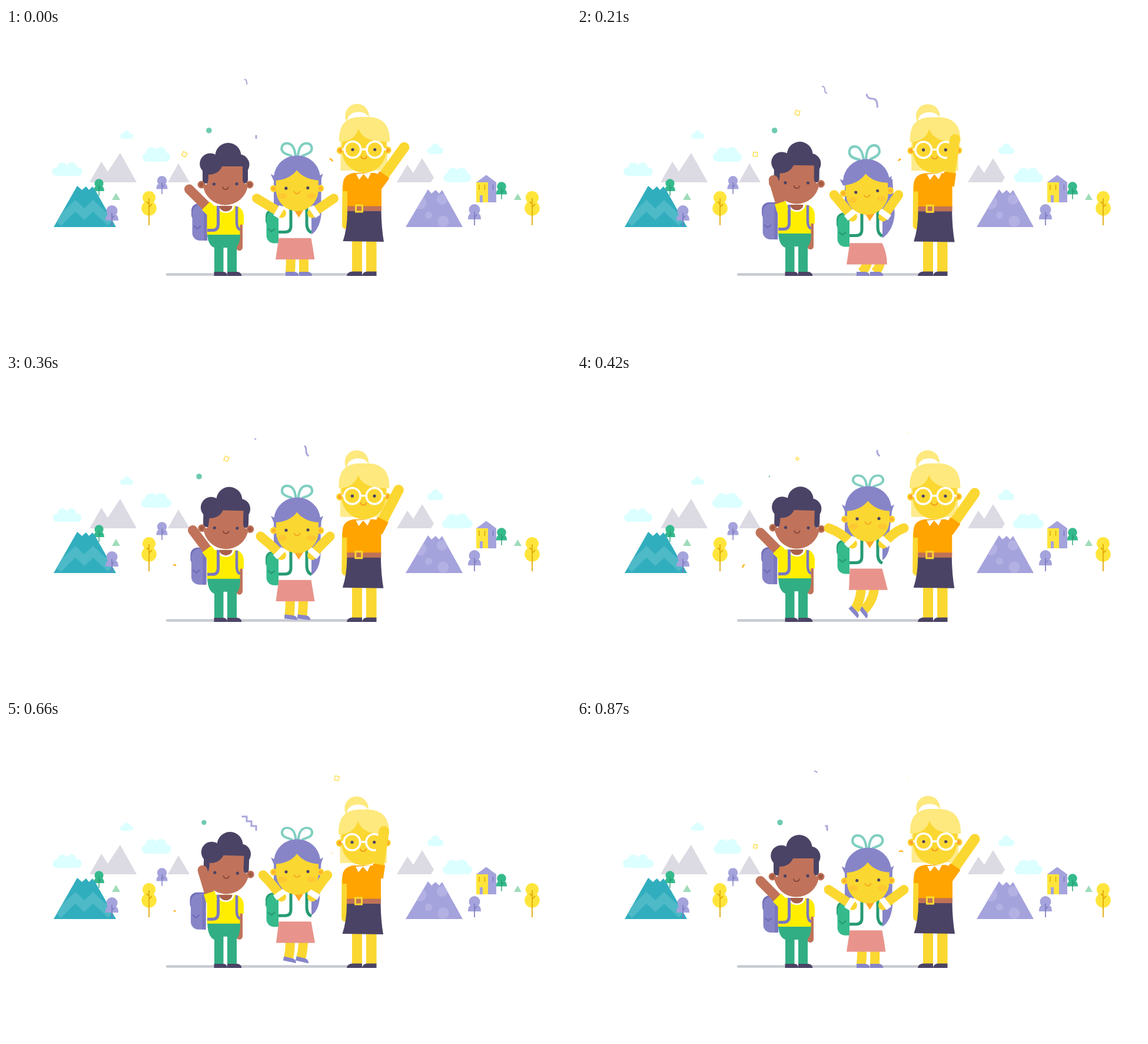
Animation, 960 px wide and 540 px high, one loop 900 ms. Source, as an HTML page with a canvas:

```html
<!DOCTYPE html>
<html lang="en">
<head>
<meta charset="utf-8">
<title>Waving class</title>
<style>
  html, body { margin: 0; width: 100%; height: 100%; overflow: hidden; background: #fff; }
  canvas { display: block; width: 960px; height: 540px; }
</style>
</head>
<body>
<canvas id="stage" width="960" height="540"></canvas>
<script>
const ctx = document.getElementById('stage').getContext('2d');
const LOOP = 900, STEP = 30, BEAT = LOOP / 2, TAU = 2 * Math.PI, RAD = Math.PI / 180;

const SKIN = '#fbd731', BROWN = '#c0735a', INK = '#4b4365', LILAC = '#8785c8',
      PALE = '#a5a3dc', MIST = '#b3b1e3', GREEN = '#35ba8c', DEEP = '#279b74',
      ORANGE = '#ffa400', BLOND = '#fde97d', SUN = '#ffe53b', MUD = '#e0a90c',
      SKY = '#dcffff', TRUNK = '#7d7ac0';
let t = 0;

// Timing
const clamp = u => Math.min(1, Math.max(0, u));
function ramp(from, to) {
  const u = clamp((t - from) / (to - from));
  return u * u * (3 - 2 * u);
}
const since = start => (t - start + LOOP) % LOOP;
const pop = (start, life) => clamp(Math.min(since(start), life - since(start)) / 70);
const wave = (delay, beat = BEAT) => Math.cos((t - delay) / beat * TAU);
const rise = () => Math.min(1, t / 560) * (1 - ramp(660, 880));

// Drawing
function fill(d, color) { ctx.fillStyle = color; ctx.fill(new Path2D(d)); }
function line(d, color, width, cap = 'butt') {
  ctx.strokeStyle = color; ctx.lineWidth = width; ctx.lineCap = cap;
  ctx.stroke(new Path2D(d));
}
function oval(x, y, rx, ry, color) {
  ctx.fillStyle = color;
  ctx.beginPath(); ctx.ellipse(x, y, rx, ry, 0, 0, TAU); ctx.fill();
}
function dot(x, y, r, color) { oval(x, y, r, r, color); }
function arc(x, y, r, from, to, color, width) {
  ctx.strokeStyle = color; ctx.lineWidth = width; ctx.lineCap = 'butt';
  ctx.beginPath(); ctx.arc(x, y, r, from * RAD, to * RAD); ctx.stroke();
}
function box(x, y, w, h, color, r = 0) {
  ctx.fillStyle = color;
  ctx.beginPath(); ctx.roundRect(x, y, w, h, r); ctx.fill();
}
function at(x, y, deg, draw) {
  ctx.save(); ctx.translate(x, y); ctx.rotate(deg * RAD); draw(); ctx.restore();
}
function clipped(d, draw) {
  ctx.save(); ctx.clip(new Path2D(d)); draw(); ctx.restore();
}

// Scenery
function cloud(x, y, w, h, grow = 0) {
  ctx.save();
  ctx.translate(x, y);
  ctx.scale(1 + grow * (1 - wave(0, LOOP)) / 2, 1);
  box(-w / 2, -h * .62, w, h * .62, SKY, h * .31);
  if (grow) {
    dot(-w * .17, -h * .6, h * .38, SKY); dot(w * .15, -h * .62, h * .38, SKY);
  } else dot(0, -h * .62, h * .38, SKY);
  ctx.restore();
}
function bush(x, top, s, color, trunk) {
  at(x, top, 0, () => {
    ctx.scale(s, s);
    fill('M-11,25C-11,18 -9,16 -7,15A9.5,9.5 0 1 1 7,15C9,16 11,18 11,25Z', color);
    line('M0,12V35M0,21l4,-4', trunk, 1.7);
  });
}
function poplar(x) {
  dot(x, 288, 11, SUN); dot(x, 306, 12.8, SUN);
  line(`M${x},289V335M${x},304l5,-5M${x},299l-4,-4`, MUD, 1.8);
}
function house() {
  fill('M799,262L816,249.5 833,262V296H799Z', PALE);
  box(799, 262, 20, 34, SUN);
  line('M804,266V275M813.5,266V275', MUD, 1.6);
  box(805, 284, 5, 12, PALE);
  line('M827.5,266V275', TRUNK, 1.6);
}
function scenery() {
  cloud(104, 251, 52, 23, -.08); cloud(255.5, 227, 47, 25, .11); cloud(205, 188, 22, 14);
  cloud(729.5, 214, 27, 18); cloud(767, 262, 47, 25, .11);
  fill('M142,262L162,227 173,244 194,212 222,262ZM275,262L293,230 312,262Z', '#dcdae3');
  fill('M664,262L682,232 692,246 707,221 727,254 722,262Z', '#dcdae3');

  bush(158, 257, .8, GREEN, DEEP);
  const peak = 'M81,338L121,268 129,275 136,269 141,275 147,269 152,276 187,338Z';
  fill(peak, '#31aebe');
  clipped(peak, () => line('M88,331l15,-15l0,0l15,-14l15,14l15,-14l15,14l15,14', '#4eb9c7', 14.5));
  bush(180, 302, 1, PALE, TRUNK);
  bush(265, 252, .86, PALE, TRUNK);

  const hill = 'M679,338L717,274 723,281 730,275 736,281 741,275 776,338Z';
  fill(hill, PALE);
  clipped(hill, () => {
    dot(703, 297, 11, MIST); dot(741, 291, 9, MIST);
    dot(718, 318, 6, MIST); dot(743, 328, 9.5, MIST);
  });
  bush(796, 300, 1, PALE, TRUNK);
  house();
  bush(842, 262, .82, GREEN, DEEP);
  poplar(243); poplar(894);
  fill('M180,292l7,-12l7,12ZM863,292l6.5,-11l6.5,11Z', '#a0dcb9');
  line('M274,418.5H600', '#c9cbd3', 4.5, 'round');
}

// Confetti
function streamer(d, length, start, width) {
  const age = since(start), head = clamp(age / 180) * length, tail = clamp((age - 40) / 420) * length;
  if (head - tail < .3) return;
  ctx.setLineDash([head - tail, 999]);
  ctx.lineDashOffset = -tail;
  line(d, '#aaa7da', width);
  ctx.setLineDash([]);
}
function square(x, y, start, life, deg, spin) {
  const half = 3.5 * pop(start, life);
  if (half) at(x, y, deg + spin * since(start), () => {
    ctx.strokeStyle = '#ffe36a'; ctx.lineWidth = Math.min(1.8, half);
    ctx.strokeRect(-half, -half, 2 * half, 2 * half);
  });
}
function curl(x, y, start, life, deg, spin) {
  const age = since(start), mid = deg + spin * age, half = 55 * Math.sin(Math.PI * age / life);
  if (age < life) arc(x, y, 4, mid - half, mid + half, '#ffb21f', 2.5);
}
function confetti() {
  streamer('M403,87q6,-.5 6,6t6,6t6,6t6,6', 37, 840, 2);
  streamer('M484,100q8,0 8,10t9,10t9,10t9,10', 56, 48, 3);
  streamer('M391,148v8h9v8h9v8h8v8h8v8', 74, 475, 3);
  dot(336 + 9 * wave(-20, LOOP), 174, 4.8 * pop(600, 740), '#6dcbb0');
  square(303, 214.5, 810, 420, -40, .75);
  square(374.5, 144, 895, 465, 3, .06);
  square(562, 99, 410, 470, 77, -.25);
  curl(550.5, 226.5, 640, 620, -393, 1.32);
  curl(285.5, 328, 240, 500, 432, -1.2);
}

// People
function ear(x, y, r, skin, inner) { dot(x, y, r, skin); dot(x, y, r * .6, inner); }
function smile(x, y, color) { line(`M${x - 5},${y}q1,4.6 5,4.6t5,-4.6`, color, 1.5); }
function raisedArm(x, y, deg, length, width, skin, sleeve, cuff) {
  at(x, y, deg, () => {
    line(`M0,-8V${-length}`, skin, width, 'round');
    line(`M0,2V${-cuff}`, sleeve, width + 3);
  });
}
function bag(x, y, w, h, main, dark) {
  box(x, y, w, 28, dark, [12, 0, 0, 8]);
  box(x + 1.5, y + 2, w - 1.5, h - 2, main, [14, 0, 0, 13]);
  line(`M${x + 4},${y + h - 25}l6,5l6,-5`, dark, 2.4);
}

function boyHead() {
  ear(332, 266, 6.5, BROWN, '#a45a43'); ear(414, 266, 6.5, BROWN, '#a45a43');
  dot(347, 230.5, 17.8, INK); dot(377.5, 217, 22, INK); dot(396, 232, 17.5, INK);
  box(334, 226, 77, 38, INK, 6);
  fill('M334.5,266H340Q344,264 344,249C356,249 364,243 367,235H402V258Q402,264 411,267A38.5,38.5 0 0 1 334.5,266Z', BROWN);
  dot(353.5, 265, 2.6, INK); dot(392, 264.7, 2.6, INK);
  smile(373, 269.5, '#7d3f35');
}
function boy() {
  const lift = rise(), bob = -5.2 * lift;
  at(0, bob, 0, () => {
    at(-2.5 * lift, 0, 0, () => {
      bag(315, 298, 27, 63, LILAC, '#706db8');
      box(336, 302, 6, 59, '#7a77bf');
    });
    line('M396.5,328V372.5', BROWN, 11, 'round');
  });

  fill(`M342,${350 + bob}Q343,369 354,373V415H369.5V${373 + bob}H376V415H392V371Q398,366 398,${350 + bob}Z`, '#32ae84');
  fill('M353.5,421V414H370Q376,415 376,421ZM376,421V414H393Q400,415 400.5,421Z', INK);

  at(0, bob, 0, () => {
    fill('M341.5,351V310Q345,303 356,302H388Q402,303 404,318V334H397.5V351Z', '#ffee00');
    fill('M359,302A14.5,12 0 0 0 388,302Z', '#fff');
    fill('M362.5,302A11,9.5 0 0 0 384.5,302Z', '#a9604a');
    line('M360.5,302V333Q360.5,343.5 351,343.5H342', '#7a77c2', 5);
    line('M392,303V329Q392,341 398,342.5', '#7a77c2', 4.5);
    at(373, 303, 2 * lift, () => { ctx.translate(-373, -303); boyHead(); });
    raisedArm(349, 311, -31 - 14.5 * wave(-7), 53, 16.5, BROWN, '#ffee00', 13);
  });
}

function leg(hx, hy, x, y, deg) {
  line(`M${hx},${hy}Q${hx},${(hy + y) / 2 + 2} ${x},${y + 1}`, SKIN, 16);
  at(x, y, deg, () => fill('M-8,0H7Q14,1 14.5,7H-8Z', LILAC));
}
function girlArm(side, reach, y, bend) {
  const sx = 494 + side * 26, sy = 314, x = 491.5 + side * reach;
  const cx = (sx + x) / 2, cy = (sy + y) / 2 - bend * 2;
  line(`M${sx},${sy}Q${cx},${cy} ${x},${y}`, SKIN, 16, 'round');
  const cuff = 10 / Math.hypot(cx - sx, cy - sy);
  line(`M${sx},${sy}l${(cx - sx) * cuff},${(cy - sy) * cuff}`, '#fff', 20);
}
function bow(stretch) {
  ctx.save();
  ctx.translate(494.5, 216); ctx.scale(1, stretch);
  for (const flip of [1, -1]) {
    ctx.scale(flip, 1);
    line('M-2,2C-3,-12 -8,-20.5 -16.5,-20.5C-26.5,-20.5 -28,-9.5 -22,-5C-18,-2 -13,-1 -8,1', '#80cfc1', 4.2);
  }
  ctx.restore();
}
function girlHead() {
  ear(455, 272, 6, SKIN, '#ffb52a'); ear(534.5, 272, 6, SKIN, '#ffb52a');
  fill('M459,240V274A36,36.5 0 0 0 531,274V240Z', SKIN);
  fill('M450,247Q453,249 455.5,250A39.5,38.5 0 0 1 534,250Q536,249 539,247L535,258.5Q508,258 494.5,241Q481,258 455,258.5Z', LILAC);
  oval(470, 284.5, 7.5, 4.8, '#fdc831'); oval(519, 284.5, 7.5, 4.8, '#fdc831');
  dot(476, 271.5, 2.6, INK); dot(513, 271, 2.6, INK);
  smile(494.5, 276, '#f39a1e');
}
function girl() {
  // Crouch, ballistic jump, soft landing
  const air = clamp((t - 345) / 350), up = 4 * air * (1 - air);
  const squat = 11 * ramp(-60, 300) * (1 - ramp(300, 345))
    + 5 * Math.sin(Math.PI * clamp((t - 695) / 190));
  const tuck = ramp(345, 410) * (1 - ramp(540, 720)), hang = ramp(420, 540) * (1 - ramp(540, 660));
  const hop = -38 * up, dy = hop + squat, headY = hop + squat * .7;

  at(0, headY, 0, () => {
    const out = 535 + .45 * squat - 7 * up, tip = 350 - 13 * up;
    fill(`M455,250V300L463,310 519,${tip}C530,${tip - 6} ${out + 3},${tip - 26} ${out},300L536,250Z`, LILAC);
    bag(441, 307, 22, 58, GREEN, DEEP);
  });

  const hip = 386 + dy, shift = squat * 1.1, foot = 414 + hop + 11 * tuck;
  leg(505 + shift, hip, 506 - 18 * tuck, foot, 51 * tuck);
  leg(483 + shift, hip, 483 - 11 * tuck, foot, 47 * tuck);

  at(0, headY, 0, () => {
    box(463, 302, 56, 66, '#fff');
    line('M484,300V336Q484,346 474,346H463', DEEP, 5);
    line('M511,303V331Q511,344 519,346.5', DEEP, 5);
    fill('M489,308H506L497.5,321.5Z', '#ffa827');
  });

  const left = 458 + 4 * tuck, right = 524 + 4 * tuck + .3 * squat, top = 356 + dy;
  fill(`M463.5,${top}H518.5Q${(518.5 + right) / 2 + .5 * squat},${top + 18} ${right},${top + 36.3}H${left}Z`, '#e8948c');

  at(0, headY, 0, () => {
    const raise = (1 - wave(30)) / 2 + .3 * hang;
    for (const side of [-1, 1]) girlArm(side, 66 - 12.5 * raise, 289.5 - 14 * raise, 5 * up);
    at(494.5, 310, 1.7 * hang - .36 * squat, () => {
      ctx.translate(-494.5, -310);
      bow(1 + .01 * squat - .18 * up);
      girlHead();
    });
  });
}

function teacherHead() {
  dot(596.5, 149, 20.2, BLOND);
  oval(599, 157, 19, 14.5, '#fff');
  box(568.5, 185, 79.5, 57, '#fdeb8d');
  ear(568, 208, 6.2, SKIN, '#ffa72a'); ear(648.5, 207.5, 6.2, SKIN, '#ffa72a');
  fill('M571,165V208A37.5,38 0 0 0 646,208V165Z', SKIN);
  fill('M566,193V187Q567,151 602,151H616Q651,152 652,188V193H640Q606,192 599,171Q593,190 572,193Z', BLOND);
  line('M571,206H576M603,206H613M640,206H646', '#fff', 3.4);
  for (const x of [589, 626.7]) {
    arc(x, 206.5, 13.7, 0, 360, '#fff', 3.6);
    dot(x, 206.5, 2.6, INK);
  }
  smile(608, 217.5, '#f08c1c');
}
function teacher() {
  const sway = rise();
  box(588, 355, 17, 60, SKIN); box(612, 355, 17.5, 60, SKIN);
  fill('M579,421Q580,413.5 589,413.5H605V421ZM605,421Q606,413.5 614,413.5H629.5V421Z', INK);
  at(-sway, sway, 0, () => {
    line('M578,270L577.5,335', SKIN, 13, 'round');
    fill('M580,310H637.5Q638,340 642,363L572.5,362Q580,340 580,310Z', INK);
    fill('M580,304V277H572.5V264Q574,248 592,246H626Q638,248 638,262V304Z', ORANGE);
    box(580, 302.5, 58, 8.5, '#bf7257');
    ctx.strokeStyle = '#ffd72e'; ctx.lineWidth = 3;
    ctx.strokeRect(594.5, 301, 11, 11);
    fill('M595,248L600,257.5 607.5,248 615,256.5 620,246Z', '#fff');
    teacherHead();
  });
  raisedArm(631, 266, 22 + 13.8 * wave(-7), 78, 17.5, SKIN, ORANGE, 21);
}

function frame() {
  t = Math.floor(performance.now() % LOOP / STEP) * STEP;
  ctx.fillStyle = '#fff';
  ctx.fillRect(0, 0, 960, 540);
  scenery();
  confetti();
  boy();
  girl();
  teacher();
  requestAnimationFrame(frame);
}
frame();
</script>
</body>
</html>
```
